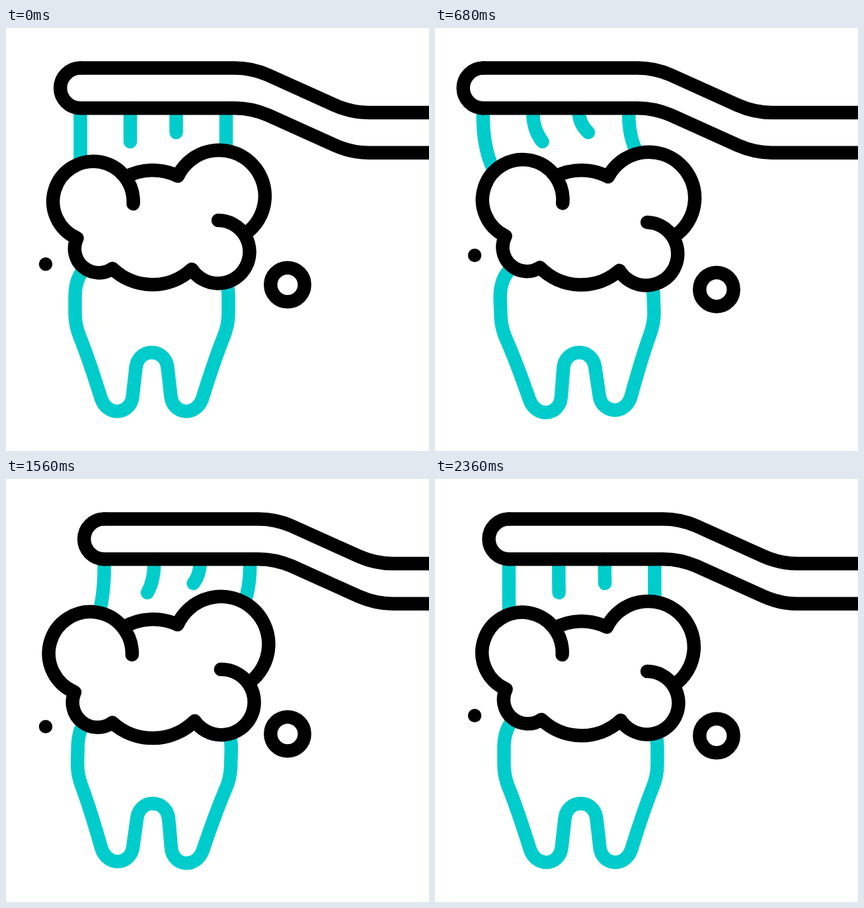
Animation of 640x640 px, one loop 2.4 s. Source, as an HTML page:

```html
<!DOCTYPE html>
<html lang="en">
<head>
<meta charset="utf-8">
<title>Brushing a tooth</title>
<style>
  html, body { margin: 0; height: 100%; overflow: hidden; background: #fff; }
  svg { display: block; width: 100%; height: 100%; }
  path, circle { fill: none; stroke: #000; stroke-width: 20.5; stroke-linecap: round; stroke-linejoin: round; }
  .teal path { stroke: #00cccc; }
  #foam path { fill: #fff; vector-effect: non-scaling-stroke; }
  #dot { fill: #000; stroke: none; }
</style>
</head>
<body>
<svg viewBox="0 0 640 640">
  <g class="teal"><path id="bristles"/></g>
  <g id="tooth" class="teal">
    <path id="half" d="M130 354C112 366 104.5 384 104.5 406V432C104.5 444 107 456 112 468
      C124 498 134 529 144 561C148 572 157 580 168 580C180 580 190 571 191.5 558L196.5 514
      C198 500 208 491 220.5 491"/>
    <use href="#half" transform="translate(441) scale(-1 1)"/>
  </g>
  <g id="brush">
    <path id="edge" d="M760 128H549C531 128 514 124 498 117L396 71C380 64 363 60.5 346 60.5H112.5"/>
    <use href="#edge" y="60.7"/>
    <path d="M112.5 60.5a30.3 30.3 0 0 0 0 60.7"/>
  </g>
  <g id="foam">
    <path d="M180 226A87 87 0 0 1 260 224A69.4 69.4 0 1 1 361 312"/>
    <path d="M192.5 266A60.7 60.7 0 1 0 107.5 318A36.5 36.5 0 0 0 161 364
      A87.5 87.5 0 0 0 281 365A47.7 47.7 0 1 0 321 291"/>
  </g>
  <circle id="ring" cx="426" r="25.7"/>
  <circle id="dot" cx="60" r="10.2"/>
</svg>
<script>
const LOOP = 2400, BEAT = 320;
const set = (id, name, value) => document.getElementById(id).setAttribute(name, value);
const ease = k => (1 - Math.cos(Math.PI * k)) / 2;

// Eased swing from 0 through alternating peaks a, b, a... and back to 0 at the end
function swing(t, first, step, peaks, end, a, b) {
  const n = t < first ? 0 : Math.min(peaks, Math.floor((t - first) / step) + 1);
  const value = i => i < 1 || i > peaks ? 0 : i % 2 ? a : b;
  const time = i => i < 1 ? 0 : i > peaks ? end : first + (i - 1) * step;
  const k = ease(Math.min(1, (t - time(n)) / (time(n + 1) - time(n))));
  return value(n) + (value(n + 1) - value(n)) * k;
}

// Brush, foam and tooth share one rhythm; each follows a little later
const scrub = (t, lag, a, b) => swing(t, BEAT + lag, BEAT, 6, LOOP, a, b);

const bristle = (x, length, bend) =>
  `M${x} 121q${bend * 0.15} ${length * 0.6} ${-bend} ${length}`;

function draw(t) {
  const shift = scrub(t, -7, 38, -44);
  const bend = scrub(t, 40, 14, -14);
  const tilt = scrub(t, 0, -1.75, 1.8);
  const swell = 1 + scrub(t, 0, 0.04, 0);

  set('brush', 'transform', `translate(${shift})`);
  set('bristles', 'd', [[112.5, 90], [188, 51], [257.5, 37], [333, 71]]
    .map(([x, length]) => bristle(x + shift, length, bend)).join(''));
  set('tooth', 'transform', `rotate(${bend * 0.14} 220 580)`);
  set('foam', 'transform', `translate(220 290) rotate(${tilt}) scale(${swell}) translate(-220 -290)`);

  set('ring', 'cy', 388.5 + swing(t, 260, 490, 3, 1750, -9, 8));

  // The dot rises through a whole loop, half a loop out of step
  const p = (t + LOOP / 2) % LOOP;
  set('dot', 'cy', 382.4 - 0.02 * p - 1.2 * Math.sin(Math.PI * p / LOOP));
  set('dot', 'opacity', Math.min(1, p / 285, (LOOP - p) / 370));
}

const start = performance.now();
function tick() {
  draw((performance.now() - start) % LOOP);
  requestAnimationFrame(tick);
}
tick();
</script>
</body>
</html>
```
